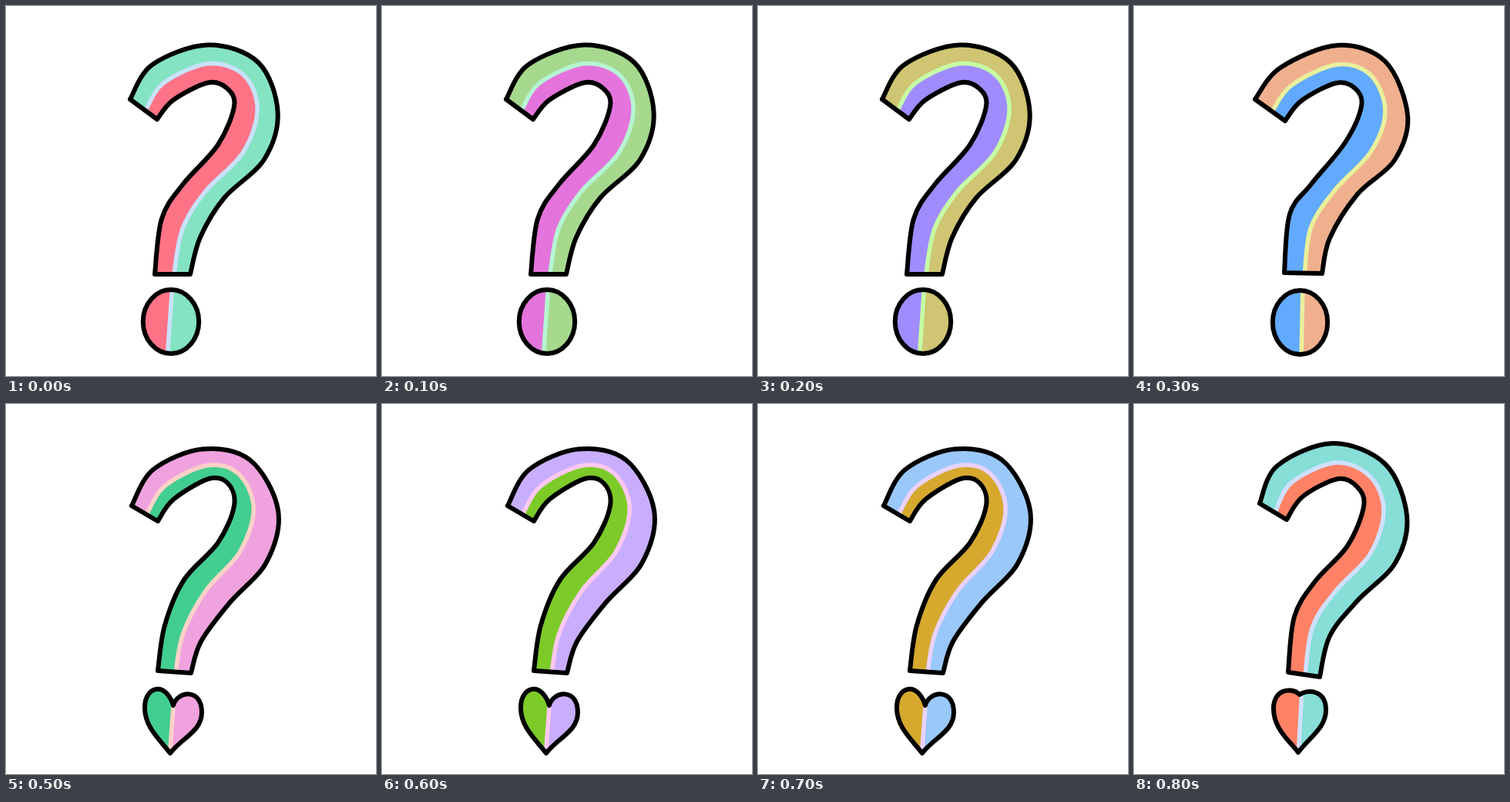
An HTML page for the animation above (900 ms loop, 480 by 480 pixels).

```html
<!DOCTYPE html>
<html lang="en">
<head>
<meta charset="utf-8">
<title>Question mark</title>
<style>
  html, body { margin: 0; width: 100%; height: 100%; overflow: hidden; background: #fff; }
  svg {
    display: block; width: 100%; height: 100%;
    animation: colours 900ms step-end infinite;
  }
  .outer { fill: var(--outer); }
  .inner { fill: var(--inner); }
  .stripe { fill: none; stroke: var(--stripe); stroke-width: 5.5; }
  .ink { fill: none; stroke: #000; stroke-width: 6; stroke-linejoin: round; }
  .pose { opacity: 0; animation: 900ms step-end infinite; }
  #round { animation-name: round; }
  #wide { animation-name: wide; }
  #bud { animation-name: bud; }
  #heart { animation-name: heart; }

  @keyframes colours {
    0%      { --inner: #ff7386; --outer: #84e3c3; --stripe: #c8e2f8; }
    11.111% { --inner: #e474dc; --outer: #a6d98e; --stripe: #b6f5d2; }
    22.222% { --inner: #a08cff; --outer: #cfc573; --stripe: #c5ffa5; }
    33.333% { --inner: #62aaff; --outer: #f0b08e; --stripe: #e9f09c; }
    44.444% { --inner: #48c2de; --outer: #ffa4ac; --stripe: #f9e2a6; }
    55.555% { --inner: #42ce90; --outer: #f0a2de; --stripe: #ffd2c8; }
    66.666% { --inner: #7ccb28; --outer: #c9aeff; --stripe: #ffc8f0; }
    77.777% { --inner: #d6a92e; --outer: #9ac8fa; --stripe: #e9d2ff; }
    88.888% { --inner: #ff8266; --outer: #86ded7; --stripe: #cfe0ff; }
  }
  @keyframes round { 0% { opacity: 1; } 33.333%, 100% { opacity: 0; } }
  @keyframes wide { 0% { opacity: 0; } 33.333% { opacity: 1; } 44.444%, 100% { opacity: 0; } }
  @keyframes bud { 0%, 55.555% { opacity: 0; } 44.444%, 88.888% { opacity: 1; } }
  @keyframes heart { 0%, 88.888% { opacity: 0; } 55.555% { opacity: 1; } }
</style>
</head>
<body>
<svg id="stage" viewBox="0 0 480 480"></svg>
<script>
const oval = (x, top, rx, ry) =>
  `M${x} ${top} a${rx} ${ry} 0 0 1 0 ${2 * ry} a${rx} ${ry} 0 0 1 0 ${-2 * ry}Z`;

// Both hook edges run from tip to foot in matching steps; bow pushes the stripe inwards.
// split holds the x where the dot's dividing line enters and leaves.
const poses = {
  round: {
    outer: '161,121 190,76 262,50.5 327,73 352.5,137 335,199 283,249 252,300 239,348',
    inner: '196,147 217,122 262,99.5 287,107 296,130 275,180 229,232 202,276 193,348',
    bow: 0,
    dot: oval(214, 368, 36.2, 41.5),
    split: [216, 209]
  },
  wide: {
    outer: '157,121 190,80 264,51 326,72 355,142 338,200 290,244 254,301 244,347',
    inner: '196,149 217,123 262,100 287,107 295,130 274,177 230,231 202,270 195,346',
    bow: 0.02,
    dot: oval(215.5, 369, 35.6, 41.5),
    split: [219, 217]
  },
  bud: {
    outer: '163,129 186,80 258,51 326,78 354,145 339,206 290,255 254,301 241,354',
    inner: '198,150 219,120 265,97 290,108 298,133 277,184 235,230 208,276 200,348',
    bow: 0.07,
    dot: 'M215 377 C224 370 249 370 249 397 C249 420 228 432 213 452 C203 438 181 422 181 395 C181 371 203 366 215 377Z',
    split: [218.5, 213]
  },
  heart: {
    outer: '163,132 191,85 255,58.5 317,73 353,138 338,205 290,258 253,308 240,349',
    inner: '197,152 217,124 263,97 288,103 296,132 275,180 231,228 206,287 197,346',
    bow: 0.09,
    dot: 'M217 391 C222 372 254 368 254 400 C254 425 228 433 213 453 C199 435 180 419 180 394 C180 366 207 359 217 391Z',
    split: [219.5, 212]
  }
};

const points = text => text.split(' ').map(p => p.split(',').map(Number));

// Smooth curve through the points (Catmull-Rom as cubic Béziers).
function curve(pts) {
  const last = pts.length - 1;
  const at = i => pts[Math.max(0, Math.min(last, i))];
  let d = `${pts[0]}`;
  for (let i = 0; i < last; i++) {
    const [a, b, c, e] = [at(i - 1), at(i), at(i + 1), at(i + 2)];
    const first = b.map((v, k) => v + (c[k] - a[k]) / 6);
    const second = c.map((v, k) => v - (e[k] - b[k]) / 6);
    d += ` C${first} ${second} ${c}`;
  }
  return d;
}

// The stripe lies near the middle of the hook and drifts inwards at the tip.
function between(outer, inner, bow) {
  return outer.map((p, i) => {
    const t = i / (outer.length - 1);
    const weight = 0.46 + 0.11 * (1 - t) ** 4 + bow * Math.sin(Math.PI * t);
    return p.map((v, k) => v + (inner[i][k] - v) * weight);
  });
}

function shape(id, outline, innerArea, stripe) {
  const clip = `clip-path="url(#${id})"`;
  return `<clipPath id="${id}"><path d="${outline}"/></clipPath>
    <path class="outer" d="${outline}"/>
    <path class="inner" d="${innerArea}" ${clip}/>
    <path class="stripe" d="${stripe}" ${clip}/>
    <path class="ink" d="${outline}"/>`;
}

function drawPose([name, { outer, inner, bow, dot, split }]) {
  const [out, inn] = [points(outer), points(inner)];
  const back = curve([...inn].reverse());
  const stripe = `M${curve(between(out, inn, bow))}`;
  const divide = `M${split[0]} 360 L${split[1]} 460`;
  return `<g class="pose" id="${name}">
    ${shape(name + '-hook', `M${curve(out)} L${back}Z`, `${stripe} L${back}Z`, stripe)}
    ${shape(name + '-dot', dot, `${divide} H150 V360Z`, divide)}
  </g>`;
}

document.getElementById('stage').innerHTML = Object.entries(poses).map(drawPose).join('');
</script>
</body>
</html>
```
